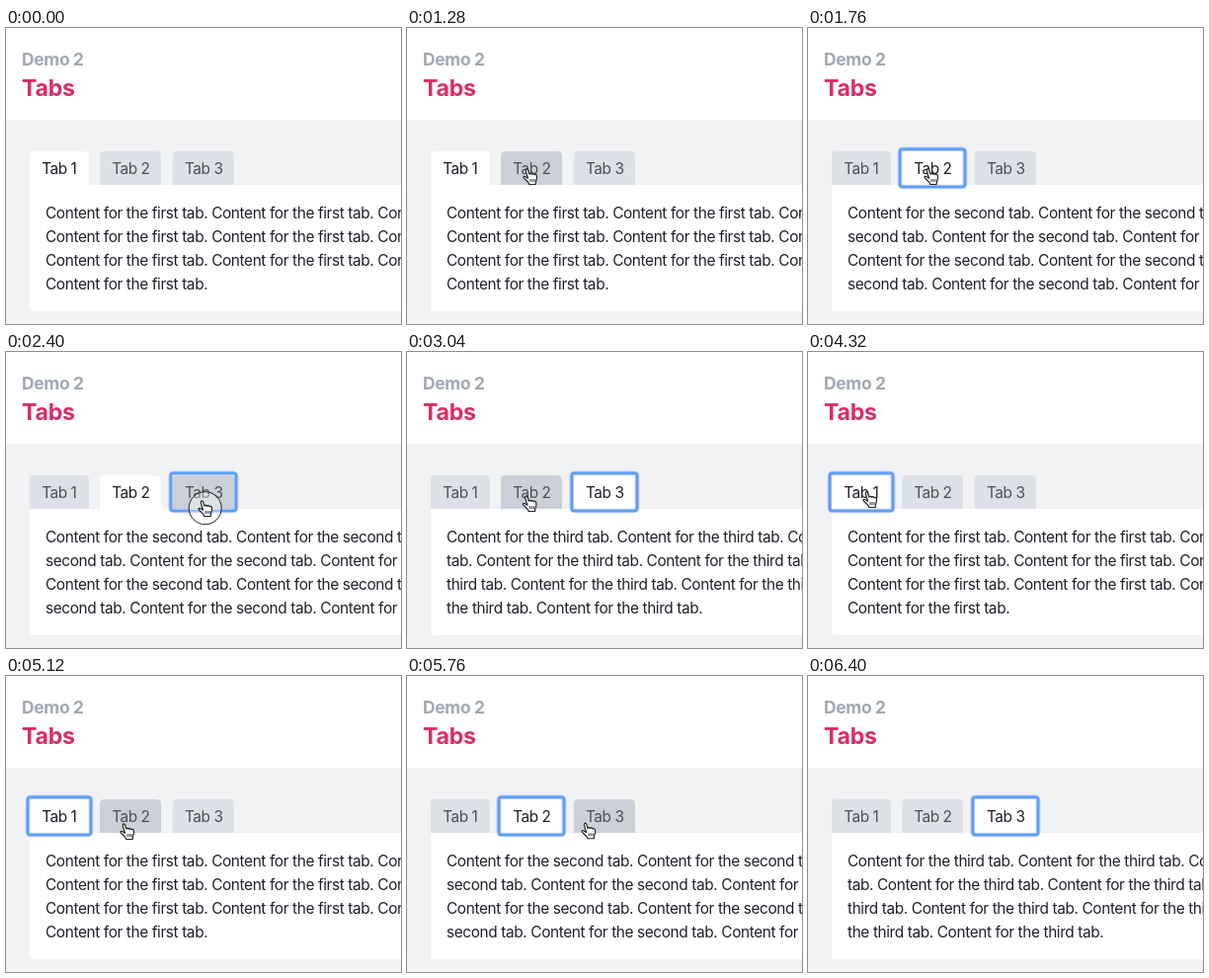
An HTML page for the animation above (7680 ms loop, 400x300 px).

```html
<!DOCTYPE html>
<html lang="en">
<head>
<meta charset="utf-8">
<title>Tabs</title>
<style>
  html, body { margin: 0; width: 100%; height: 100%; overflow: hidden; background: #f0f2f4; }
  svg { display: block; width: 100%; height: 100%; }
  text { font: 400 15.4px Inter, "Open Sans", sans-serif; letter-spacing: -.385px; fill: #1c2029; }
  .kicker { font-size: 17.4px; font-weight: 700; letter-spacing: -.3px; fill: #a1a8b3; }
  .title { font-size: 23.2px; font-weight: 700; letter-spacing: -.3px; fill: #d92d67; }
  .label { letter-spacing: -.45px; }
  .focus rect { fill: none; stroke: #5f9df7; }
</style>
</head>
<body>
<svg id="stage" viewBox="0 0 400 300">
  <rect width="400" height="300" fill="#f0f2f4"/>
  <rect width="400" height="93" fill="#fff"/>
  <text class="kicker" x="16" y="38">Demo 2</text>
  <text class="title" x="16" y="69">Tabs</text>
  <path d="M24 159H410V287H28a4 4 0 0 1-4-4Z" fill="#fff"/>
  <g id="tabs"></g>
  <g id="panels"></g>
  <g id="focus" class="focus">
    <rect y="122.8" height="38.2" rx="3" stroke-width="4.6" opacity=".45"/>
    <rect y="122.8" height="38.2" rx="2.5" stroke-width="2.6"/>
  </g>
  <g id="cursor">
    <circle id="press" cx="7.7" cy="8.2" r="16.5" fill="#fff" fill-opacity=".35" stroke="#222"/>
    <path d="M5.6 10.2C4.8 8 3.6 4.2 3.3 2.6C3 .6 5.2 .4 5.7 2L6.9 6.2C7.2 5 9.1 5 9.5 6.3C10 5.3 11.6 5.5 12 6.7C12.7 5.9 14.2 6.4 14.4 7.8C14.7 9.6 14.6 11 13.9 12.6C13.4 13.8 13.2 14.5 13.2 16.5H6.8C6.3 14.8 4.6 13 3.2 11.8C1.8 10.6 .6 9.6 1 8.8C1.6 7.8 3.4 8.6 4.4 9.6Z"
      fill="#fff" stroke="#222" stroke-width="1.2" stroke-linejoin="round"/>
    <path d="M8 11v3M10 11v3M12 11v3" stroke="#222" stroke-width=".9"/>
  </g>
</svg>
<script>
const LOOP = 7680, TICK = 160;
const byId = id => document.getElementById(id);

function add(parent, tag, attrs, text = '') {
  const node = document.createElementNS('http://www.w3.org/2000/svg', tag);
  for (const key in attrs) node.setAttribute(key, attrs[key]);
  node.textContent = text;
  return parent.appendChild(node);
}

const tabs = [[24, 60], [95, 62], [168.8, 62.2]].map(([x, w], i) => ({
  x, w,
  shape: add(byId('tabs'), 'path', {
    d: `M${x} 159V129.5a4.5 4.5 0 0 1 4.5-4.5h${w - 9}a4.5 4.5 0 0 1 4.5 4.5V159Z`
  }),
  label: add(byId('tabs'), 'text', { class: 'label', x: x + 12.2, y: 148 }, `Tab ${i + 1}`)
}));

// Each line begins at a word of the repeated sentence; the last may end early.
const panels = [
  { word: 'first', starts: [0, 0, 0, 0], lastLength: 5 },
  { word: 'second', starts: [0, 3, 0, 3], lastLength: 15 },
  { word: 'third', starts: [0, 4, 3, 2], lastLength: 8 }
].map(({ word, starts, lastLength }) => {
  const words = `Content for the ${word} tab.`.split(' ');
  const group = add(byId('panels'), 'g', {});
  starts.forEach((start, row) => {
    const length = row === 3 ? lastLength : 15;
    const line = Array.from({ length }, (_, i) => words[(start + i) % 5]).join(' ');
    add(group, 'text', { x: 40, y: 193 + 24 * row }, line);
  });
  return group;
});

const moves = [
  { from: 320, to: 1280, a: [220, 191], b: [117, 142] },
  { from: 1920, to: 2400, a: [117, 142], b: [194, 150] },
  { from: 2560, to: 3040, a: [194, 150], b: [116.4, 145] },
  { from: 3360, to: 4000, a: [116.4, 145], b: [55, 141] },
  { from: 4640, to: 5120, a: [55, 141], b: [115, 149] },
  { from: 5440, to: 5920, a: [115, 149], b: [197.5, 148] }
];
const selections = [[0, 0], [1600, 1], [2560, 2], [3200, 1], [4320, 0], [5280, 1], [6080, 2]];
const focuses = [[0, -1], [1440, 1], [2400, 2], [3200, 1], [4320, 0], [5280, 1], [6080, 2]];
const presses = [[1440, 1760], [2400, 2720]];

const latest = (list, t) => list.filter(([at]) => at <= t).pop()[1];
const show = (node, on) => node.setAttribute('visibility', on ? 'inherit' : 'hidden');

function cursorAt(t) {
  const { from, to, a, b } = moves.filter(m => m.from <= t).pop() || moves[0];
  const p = Math.min(1, Math.max(0, (t - from) / (to - from)));
  const eased = p * p * (3 - 2 * p);
  return a.map((v, i) => v + (b[i] - v) * eased);
}

function draw(now) {
  const t = Math.floor(now % LOOP / TICK) * TICK;
  const selected = latest(selections, t), focused = latest(focuses, t);
  const visible = t >= 320 && t < 6400;
  const [x, y] = cursorAt(t);

  tabs.forEach((tab, i) => {
    const hot = visible && x + 5 >= tab.x && x + 5 <= tab.x + tab.w && y + 1 >= 125 && y + 1 < 159;
    tab.shape.setAttribute('fill', i === selected ? '#fff' : hot ? '#cbd0d8' : '#dde0e6');
    tab.label.style.fill = i === selected ? '#1c2029' : '#4b4f56';
    show(panels[i], i === selected);
  });

  show(byId('focus'), focused >= 0);
  if (focused >= 0) {
    for (const ring of byId('focus').children) {
      ring.setAttribute('x', tabs[focused].x - 2);
      ring.setAttribute('width', tabs[focused].w + 4);
    }
  }

  show(byId('cursor'), visible);
  show(byId('press'), presses.some(([from, to]) => t >= from && t < to));
  byId('cursor').setAttribute('transform', `translate(${x} ${y})`);
}

function loop() {
  draw(performance.now());
  requestAnimationFrame(loop);
}
loop();
</script>
</body>
</html>
```
